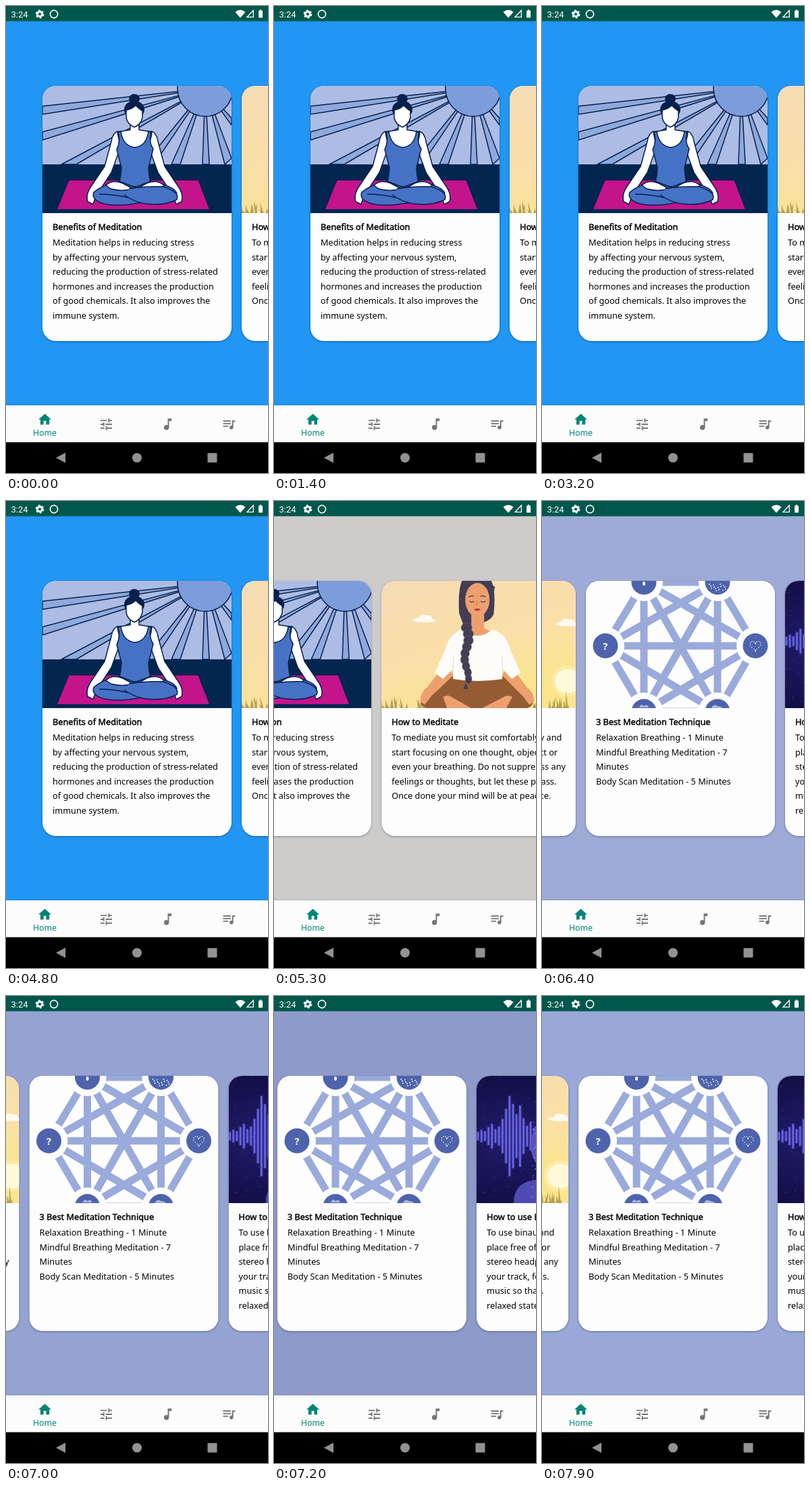
These frames come from a looping animation (388x690 px, 8000 ms). An HTML page:

```html
<!DOCTYPE html>
<html lang="en">
<head>
<meta charset="utf-8">
<title>Meditation cards</title>
<style>
html, body { margin: 0; width: 100%; height: 100%; overflow: hidden; background: #000; }
svg { display: block; width: 388px; height: 690px; }
.card { filter: drop-shadow(0 1px 1.5px rgba(0,0,0,.35)); }
text { font: 12.72px "Noto Sans", "Open Sans", sans-serif; }
.title { stroke: #000; stroke-width: .45px; }
.clock { font: 13px Roboto, sans-serif; fill: #fff; }
.home { font-size: 12.3px; fill: #008577; }
</style>
</head>
<body>
<svg viewBox="0 0 388 690">
  <defs>
    <clipPath id="face"><rect width="280" height="377" rx="20"/></clipPath>
    <clipPath id="pic"><rect width="280" height="188"/></clipPath>
    <linearGradient id="dawn" x2=".5" y2="1">
      <stop stop-color="#f5dcb4"/><stop offset=".6" stop-color="#fbdfa8"/><stop offset="1" stop-color="#fae58c"/>
    </linearGradient>
    <radialGradient id="night" cx=".2" cy=".5" r=".6">
      <stop stop-color="#211c6c"/><stop offset="1" stop-color="#100c40"/>
    </radialGradient>
  </defs>
  <rect id="back" width="388" height="600"/>
  <g id="cards"></g>

  <rect width="388" height="22.5" fill="#00574b"/>
  <text class="clock" x="7.5" y="16.5">3:24</text>
  <g fill="#fff">
    <circle cx="50" cy="12" r="3.6" fill="none" stroke="#fff" stroke-width="3"/>
    <circle cx="50" cy="12" r="5.4" fill="none" stroke="#fff" stroke-width="2" stroke-dasharray="2.83"/>
    <circle cx="71" cy="12" r="5.6" fill="none" stroke="#fff" stroke-width="1.6"/>
    <path d="M339.500 9Q347 2.500 354.500 9L347 17.500z"/>
    <path d="M357 16.300L366.300 6.500V16.300z" fill="none" stroke="#fff" stroke-width="1.300"/>
    <path d="M374 7h1.700v-1.500h2.600v1.500h1.700v10.300h-6z"/>
  </g>

  <rect y="590" width="388" height="55" fill="#fcfcfc"/>
  <rect y="589" width="388" height="1" opacity=".12"/>
  <g id="icons" fill="#757575"></g>
  <text class="home" x="57.500" y="635" text-anchor="middle">Home</text>
  <rect y="644.500" width="388" height="46"/>
  <g fill="#929292">
    <path d="M74 667.500L88 660v15z"/>
    <circle cx="194" cy="667.500" r="7"/>
    <rect x="298.500" y="660.500" width="14" height="14" rx="1"/>
  </g>
</svg>
<script>
const $ = id => document.getElementById(id);
const path = (d, fill, extra = '') => `<path d="${d}" fill="${fill}" ${extra}/>`;
const disc = (x, y, rx, ry, fill, extra = '') =>
  `<ellipse cx="${x}" cy="${y}" rx="${rx}" ry="${ry}" fill="${fill}" ${extra}/>`;
const box = fill => `<rect width="280" height="188" fill="${fill}"/>`;
const range = n => [...Array(n).keys()];
let seed = 7;
const rnd = () => (seed = seed * 16807 % 2147483647) / 2147483647;

function yoga() {
  const navy = '#06204e', line = `stroke="${navy}" stroke-width="1.5" stroke-linejoin="round"`;
  const rays = [[0, 30, 0, 42], [0, 68, 0, 80], [28, 116, 50, 116], [151, 116, 165, 116],
    [191, 116, 204, 116], [237, 116, 247, 116], [270, 116, 280, 107], [280, 48, 280, 58]];
  const pair = d => path(d, '#fff', line) +
    `<g transform="matrix(-1 0 0 1 273 0)">${path(d, '#fff', line)}</g>`;
  return box('#adbce4') +
    rays.map(([a, b, c, d]) => path(`M241 4L${a} ${b}L${c} ${d}z`, '#8fa9dc', line)).join('') +
    disc(241, 4, 41, 41, '#7d9cda', line) +
    path('M0 116H280V188H0z', '#022650') +
    path('M39 139H231L248 183H21z', '#c4148c', line) +
    pair('M112 67Q104 69 102 82L92 119L71 150Q64 161 67 171L75 175L79 163L102 128L115 92z') +
    path('M130 54V65L111 68Q114 96 137 97Q160 96 162 68L143 65V54z', '#fff', line) +
    path('M116 67Q119 89 137 91Q154 89 157 67L161 69Q157 83 164 93L157 121Q158 139 162 149H112Q116 137 117 121L110 94Q116 82 112 69z', '#4672c6', line) +
    path('M114 141Q91 145 76 157Q72 167 87 173Q109 180 149 172L199 159Q196 148 160 141L137 150z', '#4672c6', line) +
    path('M94 147Q103 138 119 144L134 152Q118 157 101 152zM180 147Q170 138 154 144L140 152Q157 157 174 152z', '#fff', line) +
    path('M128 152Q155 148 179 149Q204 157 199 168Q180 178 151 174Q135 171 121 161M84 160Q105 160 126 165', '#4672c6', line) +
    disc(136, 19, 8, 7, navy) + disc(136, 35, 15, 13, navy) +
    path('M124 36Q133 34 138 29Q143 34 148 37V47Q145 58 136 61Q126 57 124 47z', '#fff', line);
}

function dawn() {
  const hair = '#443d54', skin = '#eda06e', brown = '#955c34';
  const cloud = (x, y) => path(`M${x - 16} ${y + 4}q3-6 9-4q3-8 11-4q8-1 9 5q4 0 5 4q-18 3-34-1z`, '#fffaf0');
  const grass = range(75).map(i => {
    const x = rnd() * 280, h = 5 + rnd() * (i % 7 ? 13 : 27);
    return `M${x - 2} 188l${(rnd() * 8 - 3).toFixed(1)}-${h.toFixed(1)}L${x + 1.5} 188`;
  }).join('');
  const braid = range(9).map(i => disc(126 + 3 * Math.sin(i), 69 + i * 9.5, 8 - i * .4, 7, hair,
    'stroke="#655a6c" stroke-width=".6"')).join('');
  return box('url(#dawn)') + cloud(62, 55) + cloud(266, 61) +
    disc(268, 148, 19, 18, '#fffbe4') + disc(268, 148, 24, 23, '#fff6c8', 'opacity=".4"') +
    path(grass, '#b5a054') +
    path('M115 48Q112 0 126-9H158Q171 9 166 50Q160 60 148 62L124 73z', hair) +
    path('M133 45H152V70L166 77L142 91L118 77L133 70z', skin) +
    disc(142, 28, 18, 25, skin) +
    path('M121 31Q123 3 142 2Q159 4 163 31L168 9L145-8L119 2z', hair) +
    path('M129 24q4-3 8-1M146 23q5-2 8 1M130 30q4 3 7 0M147 30q4 3 7 0', 'none', `stroke="${hair}" stroke-width="1.2"`) +
    path('M141 28l-1 7h4', 'none', 'stroke="#cb7b52"') +
    path('M137 42q5-3 10 0q-5 5-10 0z', '#c53d45') +
    path('M105 140H179L222 166Q229 184 216 188H67Q53 184 60 167z', brown) +
    path('M94 123L68 157Q58 164 57 178L64 183L74 170L107 139zM190 123L215 157Q226 164 226 178L219 183L209 170L178 139z', skin) +
    path('M121 72Q142 90 164 72Q185 77 191 102L206 136L193 145L179 130V145Q143 151 106 145V130L91 145L79 136L94 102Q101 76 121 72z', '#fdfcf8') +
    path('M107 112L105 139M178 112L180 139', 'none', 'stroke="#dfd7ce"') +
    path('M91 171Q113 165 140 178Q165 165 194 171L185 188H97z', skin) +
    path('M108 157L142 176L178 157L188 168L149 188H133L97 168z', brown) +
    braid + path('M125 150l-4 10h7z', hair);
}

function graph() {
  const nodes = [[29, 96], [251, 96], [86, 2], [195, 2], [86, 193], [195, 193]];
  const edges = nodes.flatMap((a, i) => nodes.slice(i + 1).map(b => `M${a}L${b}`)).join('');
  const heart = range(18).map(i => {
    const a = i * Math.PI / 9;
    return disc(251 + 8 * Math.sin(a) ** 3, 95.5 - (13 * Math.cos(a) - 5 * Math.cos(2 * a)
      - 2 * Math.cos(3 * a) - Math.cos(4 * a)) * .5, .75, .75, '#fff');
  }).join('');
  const dots = range(15).map(i =>
    disc(183 + i * 7 % 25, 5 + i * 5 % 13 * .8, .9, .9, '#fff')).join('');
  return box('#fdfdfd') + path(edges, 'none', 'stroke="#9aaadb" stroke-width="11"') +
    nodes.map(([x, y]) => disc(x, y, 28, 28, '#fdfdfd') + disc(x, y, 18.5, 18.5, '#4e63ac')).join('') +
    '<text x="29" y="101.500" text-anchor="middle" style="font-size:15px;font-weight:600" fill="#fff">?</text>' +
    heart + dots + disc(86, 4, 2, 3, '#fff') +
    path('M79 187q3-7 7-2q5-4 7 2zM186 188q3-7 9-3q6 0 8 4z', '#aab7df');
}

function sound() {
  const tall = [10, 16, 12, 24, 34, 18, 26, 48, 78, 116, 92, 62, 88, 50, 28, 40, 22, 14];
  const bars = tall.map((h, i) => `M${2 + i * 5.2} ${89 - h / 2}v${h}`).join('');
  const specks = range(90).map(() =>
    disc(rnd() * 110, rnd() * 188, .6, .6, '#7775dd', 'opacity=".5"')).join('');
  const glow = range(90).map(() =>
    disc(82 + rnd() * 44, 68 + rnd() * 112, .8, .8, '#c0b8ff', 'opacity=".65"')).join('');
  return box('url(#night)') + specks +
    path(bars, 'none', 'stroke="#5652cc" stroke-width="5" opacity=".35" stroke-linecap="round"') +
    path(bars, 'none', 'stroke="#6964e3" stroke-width="2.6" stroke-linecap="round"') +
    disc(114, 102, 34, 42, '#5954bd') +
    path('M55 188Q55 163 76 156L102 151H160V188z', '#504ab3') + glow;
}

const cards = [
  [yoga, 'Benefits of Meditation', 'Meditation helps in reducing stress|by affecting your nervous system,|reducing the production of stress-related|hormones and increases the production|of good chemicals. It also improves the|immune system.'],
  [dawn, 'How to Meditate', 'To mediate you must sit comfortably and|start focusing on one thought, object or|even your breathing. Do not suppress any|feelings or thoughts, but let these pass.|Once done your mind will be at peace.'],
  [graph, '3 Best Meditation Technique', 'Relaxation Breathing - 1 Minute|Mindful Breathing Meditation - 7|Minutes|Body Scan Meditation - 5 Minutes'],
  [sound, 'How to use Binaural Beats', 'To use binaural beats, find a|place free of distractions, wear|stereo headphones and play|your track, focus on the|music so that you reach a|relaxed state.']
];
$('cards').innerHTML = cards.map(([draw, title, body], i) =>
  `<g class="card" transform="translate(${54 + 295 * i} 118)"><g clip-path="url(#face)">
  <rect width="280" height="377" fill="#fdfdfd"/><g clip-path="url(#pic)">${draw()}</g>
  <text class="title" x="15" y="212.500">${title}</text>
  ${body.split('|').map((s, n) => `<text x="15" y="${236 + n * 21.6}">${s}</text>`).join('')}</g></g>`).join('');

const icon = (x, y, d, fill = '') =>
  `<path transform="translate(${x - 11.3} ${y - 11.3}) scale(.944)" d="${d}" ${fill}/>`;
$('icons').innerHTML =
  icon(57.5, 611, 'M10 20v-6h4v6h5v-8h3L12 3 2 12h3v8z', 'fill="#008577"') +
  icon(148.5, 618, 'M3 17v2h6v-2H3zM3 5v2h10V5H3zm10 16v-2h8v-2h-8v-2h-2v6h2zM7 9v2H3v2h4v2h2V9H7zm14 4v-2H11v2h10zm-6-4h2V7h4V5h-4V3h-2v6z') +
  icon(239.5, 618, 'M12 3v10.550c-.59-.34-1.270-.55-2-.55-2.210 0-4 1.790-4 4s1.790 4 4 4 4-1.790 4-4V7h4V3h-6z') +
  icon(330, 618, 'M15 6H3v2h12V6zm0 4H3v2h12v-2zM3 16h8v-2H3v2zM17 6v8.180c-.31-.11-.65-.18-1-.18-1.660 0-3 1.340-3 3s1.340 3 3 3 3-1.340 3-3V8h3V6h-5z');

// Scroll segments: start, end, from, to, easing
const drag = u => u * u, settle = u => 1 - (1 - u) ** 3, smooth = u => u * u * (3 - 2 * u);
const moves = [
  [5050, 5300, 0, 189, drag], [5300, 5700, 189, 295, settle],
  [6050, 6200, 295, 430, drag], [6200, 6540, 430, 590, settle],
  [6850, 7200, 590, 639, smooth], [7220, 7650, 639, 590, settle]
];
function scrollAt(t) {
  let s = 0;
  for (const [a, b, from, to, ease] of moves)
    if (t >= a) s = from + (to - from) * ease(Math.min(1, (t - a) / (b - a)));
  return s;
}

// Background blends between card colours in linear light
const tints = [[33, 150, 243], [251, 228, 176], [154, 168, 216], [20, 25, 95]];
function tintAt(page) {
  const i = Math.min(2, Math.floor(page)), u = page - i;
  const mix = tints[i].map((c, k) =>
    Math.round((c ** 2.2 * (1 - u) + tints[i + 1][k] ** 2.2 * u) ** (1 / 2.2)));
  return `rgb(${mix})`;
}

function frame() {
  const s = scrollAt(performance.now() % 8000);
  $('cards').setAttribute('transform', `translate(${-s} 0)`);
  $('back').setAttribute('fill', tintAt(s / 295));
  requestAnimationFrame(frame);
}
frame();
</script>
</body>
</html>
```
